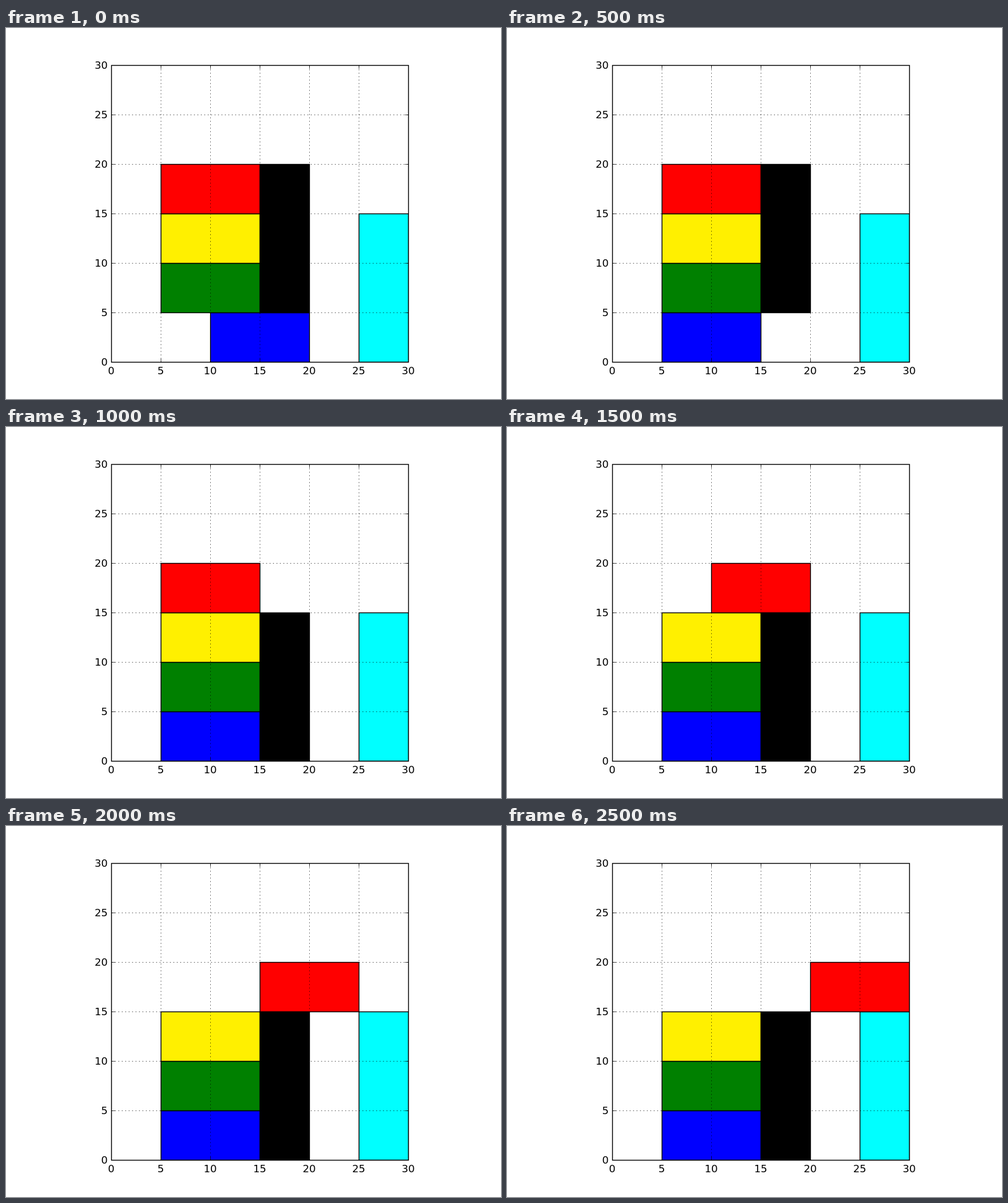
An HTML page with a canvas that plays this animation: 800x600 px, repeating every 3 s.

```html
<!DOCTYPE html>
<html lang="en">
<head>
<meta charset="utf-8">
<title>Sliding blocks</title>
<style>
  html, body { margin: 0; width: 100%; height: 100%; overflow: hidden; background: #fff; }
  canvas { display: block; }
</style>
</head>
<body>
<canvas id="stage" width="800" height="600"></canvas>
<script>
const ctx = document.getElementById('stage').getContext('2d');
const PT = 100 / 72;
const STEP = 500, STEPS = 6;
const LEFT = 170, RIGHT = 650, TOP = 60, BOTTOM = 540, UNIT = 16;
const TICK = 4 * PT;
const values = [0, 5, 10, 15, 20, 25, 30];

const px = x => LEFT + x * UNIT;
const py = y => BOTTOM - y * UNIT;

// Block positions in plot units at a given step.
function blocksAt(step) {
  const redX = 5 + 5 * Math.max(0, step - 2);
  return [
    ['#00ffff', 25, 0, 5, 15],
    ['#0000ff', step < 1 ? 10 : 5, 0, 10, 5],
    ['#008000', 5, 5, 10, 5],
    ['#fff000', 5, 10, 10, 5],
    ['#ff0000', redX, 15, 10, 5],
    ['#000000', 15, step < 2 ? 5 : 0, 5, 15]
  ];
}

function line(x1, y1, x2, y2) {
  ctx.beginPath();
  ctx.moveTo(x1, y1);
  ctx.lineTo(x2, y2);
  ctx.stroke();
}

function drawBlocks(step) {
  ctx.save();
  ctx.beginPath();
  ctx.rect(LEFT, TOP, RIGHT - LEFT, BOTTOM - TOP);
  ctx.clip();
  ctx.lineWidth = PT;
  for (const [color, x, y, w, h] of blocksAt(step)) {
    const box = [px(x) + 0.5, py(y + h) + 0.5, w * UNIT, h * UNIT];
    ctx.fillStyle = color;
    ctx.fillRect(...box);
    ctx.strokeRect(...box);
  }
  ctx.restore();
}

function drawGrid() {
  ctx.lineWidth = 0.5 * PT;
  for (const v of values) {
    const x = px(v) + 0.5, y = py(v) + 0.5;
    ctx.setLineDash([PT, 3 * PT]);
    line(x, BOTTOM + 0.5, x, TOP + 0.5);
    line(LEFT + 0.5, y, RIGHT + 0.5, y);
    ctx.setLineDash([]);
    line(x, BOTTOM + 0.5, x, BOTTOM + 0.5 - TICK);
    line(x, TOP + 0.5, x, TOP + 0.5 + TICK);
    line(LEFT + 0.5, y, LEFT + 0.5 + TICK, y);
    line(RIGHT + 0.5, y, RIGHT + 0.5 - TICK, y);
  }
}

function drawFrame() {
  ctx.lineWidth = PT;
  ctx.strokeRect(LEFT + 0.5, TOP + 0.5, RIGHT - LEFT, BOTTOM - TOP);
}

function drawLabels() {
  ctx.fillStyle = '#000';
  ctx.font = `${12 * PT}px "DejaVu Sans", sans-serif`;
  ctx.textBaseline = 'alphabetic';
  for (const v of values) {
    ctx.textAlign = 'center';
    ctx.fillText(v, px(v), BOTTOM + 20);
    ctx.textAlign = 'right';
    ctx.fillText(v, LEFT - TICK, py(v) + 6);
  }
}

function draw(now) {
  const step = Math.floor(now / STEP) % STEPS;
  ctx.fillStyle = '#fff';
  ctx.fillRect(0, 0, 800, 600);
  ctx.strokeStyle = '#000';
  drawBlocks(step);
  drawGrid();
  drawFrame();
  drawLabels();
}

const start = performance.now();
function tick() {
  draw(performance.now() - start);
  requestAnimationFrame(tick);
}
tick();
</script>
</body>
</html>
```
